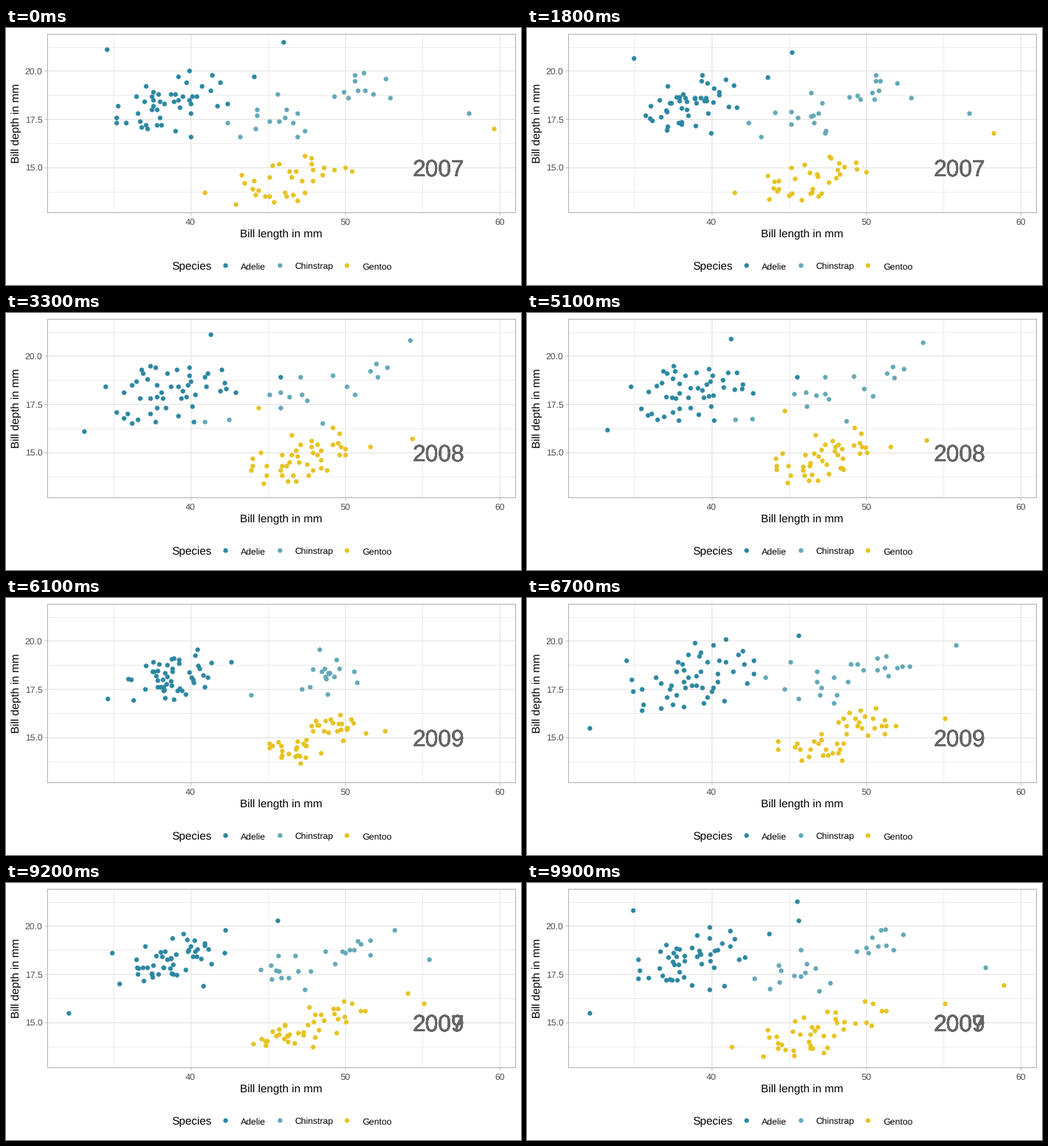
These frames come from a looping animation (700 px wide and 350 px high, 10000 ms). A matplotlib script:

```python
from collections import namedtuple

import numpy as np
import matplotlib.pyplot as plt
from matplotlib.animation import FuncAnimation

W, H, DPI = 700, 350, 100
PT = 72 / DPI
DOT = 6.4 * PT
plt.rcParams["font.family"] = "Liberation Sans"
plt.rcParams["text.hinting"] = "none"

YEARS = ("2007", "2008", "2009")
# Where in each year's rows the extreme birds stand, as a share of the rest
EXTREME_ROW = (0.75, 0, 1)

# A species is two clouds (the sexes), gap either side of a centre that drifts
# from year to year, plus a few extreme birds per year; lengths in mm
Species = namedtuple("Species",
                     "color counts centre drift gap noise extremes")
SPECIES = {
    "Adelie": Species(
        "#2c87a1", (49, 50, 52), (38.7, 18.4), (0.1, -0.15),
        (1.1, 0.45), (1.8, 0.85),
        ([(34.6, 21.1), (46.0, 21.5), (44.1, 19.7)],
         [(33.1, 16.1), (41.3, 21.1), (45.8, 18.9)],
         [(32.1, 15.5), (45.6, 20.3)])),
    "Gentoo": Species(
        "#e6c322", (34, 45, 42), (46.6, 14.6), (0.8, 0.25),
        (1.4, 0.55), (1.5, 0.5),
        ([(59.6, 17.0), (40.9, 13.7), (42.9, 13.1)],
         [(54.3, 15.7), (44.4, 17.3)],
         [(55.1, 16.0), (49.9, 16.1)])),
    "Chinstrap": Species(
        "#64a8b8", (26, 18, 24), (48.7, 18.4), (0.2, 0),
        (2.2, 0.7), (1.3, 0.75),
        ([(58.0, 17.8), (42.4, 17.3), (43.2, 16.6)],
         [(54.2, 20.8), (40.9, 16.6), (42.5, 16.7)],
         [(55.8, 19.8), (43.5, 18.1)])),
}

XLIM, YLIM = (30.725, 60.975), (12.68, 21.92)
LEFT, RIGHT, TOP, BOTTOM = 55.9, 691.9, 7.9, 250.9
SCALE = np.array([(RIGHT - LEFT) / (XLIM[1] - XLIM[0]),
                  (BOTTOM - TOP) / (YLIM[1] - YLIM[0])])


def cloud(sp, year, rng):
    """Birds of one species in one year, in row order."""
    centre = np.array(sp.centre) + year * np.array(sp.drift)
    extremes = sp.extremes[year]
    taken, fill = list(extremes), []
    while len(taken) < sp.counts[year]:
        z = rng.normal(size=2)
        sex = 1 if len(fill) % 2 else -1
        p = np.round(centre + sex * np.array(sp.gap) + z * sp.noise, 1)
        clear = np.hypot(*((np.array(taken) - p) * SCALE).T).min() > 5.5
        if clear and np.abs(z).max() < 1.9:
            taken.append(p)
            fill.append(p)
    row = int(EXTREME_ROW[year] * len(fill))
    return np.array(fill[:row] + extremes + fill[row:])


rng = np.random.default_rng(7)
data = {name: [cloud(sp, year, rng) for year in range(3)]
        for name, sp in SPECIES.items()}

fig = plt.figure(figsize=(W / DPI, H / DPI), dpi=DPI, facecolor="white")


def label(x, y, s, size, color="black", ha="center", rotation=0):
    """Text with its baseline at pixel (x, y) from the top left."""
    return fig.text(x / W, 1 - y / H, s, fontsize=size * PT, color=color,
                    ha=ha, va="baseline", rotation=rotation,
                    rotation_mode="anchor")


ax = fig.add_axes([LEFT / W, 1 - BOTTOM / H,
                   (RIGHT - LEFT) / W, (BOTTOM - TOP) / H])
ax.set(xlim=XLIM, ylim=YLIM, axisbelow=True)
x_ticks, y_ticks = np.arange(40, 61, 10), np.arange(15, 21, 2.5)
ax.set_xticks(x_ticks, labels=[])
ax.set_yticks(y_ticks, labels=[])
ax.set_xticks(x_ticks - 5, minor=True)
ax.set_yticks(np.arange(13.75, 22, 2.5), minor=True)
ax.grid(which="major", color="#dedede", lw=0.9 * PT)
ax.grid(which="minor", color="#dedede", lw=0.55 * PT)
ax.tick_params(which="major", length=3.7 * PT, width=0.8 * PT, color="#b3b3b3")
ax.tick_params(which="minor", length=0)
for side in ax.spines.values():
    side.set(color="#b3b3b3", linewidth=1.1 * PT)

for v in x_ticks:
    label(LEFT + (v - XLIM[0]) * SCALE[0], 268, str(v), 12.2, "#4d4d4d")
for v in y_ticks:
    label(49.5, BOTTOM - (v - YLIM[0]) * SCALE[1] + 4.3, f"{v:.1f}", 12.2,
          "#4d4d4d", "right")
label(374, 285.3, "Bill length in mm", 15.2)
label(18.3, 130, "Bill depth in mm", 15.2, rotation=90)

label(225, 329, "Species", 15.2, ha="left")
keys = fig.add_axes([0, 0, 1, 1], xlim=(0, W), ylim=(H, 0))
keys.axis("off")
for name, x in (("Adelie", 298.2), ("Chinstrap", 371.5), ("Gentoo", 463)):
    keys.plot(x, 322.8, "o", ms=DOT, mew=0, color=SPECIES[name].color)
    label(x + 20.9, 328.4, name, 12.2, ha="left")

dots = {name: ax.plot([], [], "o", ms=DOT, mew=0, color=sp.color)[0]
        for name, sp in SPECIES.items()}

# The year is overprinted, which hardens its edges
stamps = {y: [label(587.6, 201.3, y, 31.8, "#666666") for _ in range(8)]
          for y in YEARS}

MOVES = ((16, 33), (50, 67), (84, 100))


def phase(frame):
    """Current state and linear progress towards the next one."""
    for i, (start, end) in enumerate(MOVES):
        if frame < end:
            return i, max(0, frame - start) / (end - start)


def update(frame):
    i, t = phase(frame)
    j = (i + 1) % 3
    for name, line in dots.items():
        pts, goal = data[name][i].copy(), data[name][j]
        n = min(len(pts), len(goal))
        # Birds without a partner wait, then vanish
        pts[:n] += t * (goal[:n] - pts[:n])
        line.set_data(*pts.T)
    shown = {YEARS[i] if t < 0.5 else YEARS[j]}
    # The last year has spare birds that keep its label to the end
    if i == 2:
        shown.add(YEARS[i])
    for year, texts in stamps.items():
        for text in texts:
            text.set_visible(year in shown)
    return list(dots.values())


anim = FuncAnimation(fig, update, frames=100, interval=100, repeat=True,
                     repeat_delay=0, blit=False)
plt.show()
```
